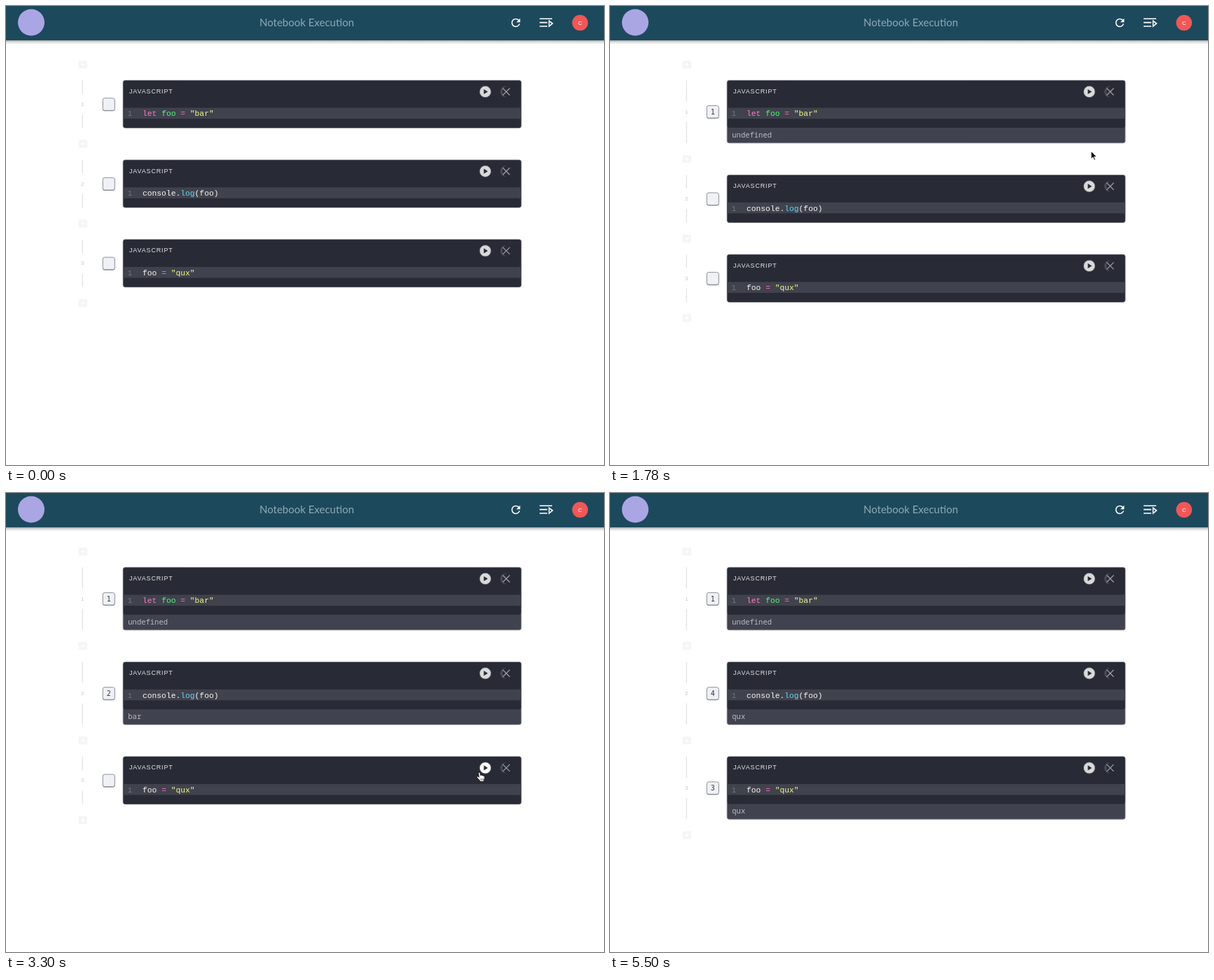
An HTML page for the animation above (6.47 s loop, 854 by 656 pixels).

```html
<!DOCTYPE html>
<html lang="en">
<head>
<meta charset="utf-8">
<title>Notebook Execution</title>
<style>
  html, body { margin: 0; width: 100%; height: 100%; overflow: hidden; background: #fff; }
  svg { display: block; width: 854px; height: 656px; }
  text { white-space: pre; }
  .title { font: 15px Lato, sans-serif; fill: #8fa9b3; text-anchor: middle; }
  .label { font: 9px "Liberation Sans", Arial, sans-serif; letter-spacing: .85px; fill: #e4e4e6; }
  .code { font: 11.3px "Liberation Mono", "Courier New", monospace; fill: #f8f8f2; }
  .out { font: 10.5px "Noto Sans Mono", "DejaVu Sans Mono", monospace; fill: #b9bac2; }
  .count { font: 10px "DejaVu Sans Mono", monospace; fill: #33353f; text-anchor: middle; }
  .index { font: 8px "Liberation Sans", Arial, sans-serif; fill: #c6c6c6; text-anchor: middle; }
  .initial { font: 8px "Liberation Sans", Arial, sans-serif; fill: #fff; text-anchor: middle; }
  .num { fill: #6c7680; }
  .kw { fill: #ff79c6; }
  .def { fill: #50fa7b; }
  .str { fill: #f1fa8c; }
  .prop { fill: #66d9ef; }
</style>
</head>
<body>
<svg id="stage" viewBox="0 0 854 656" xmlns="http://www.w3.org/2000/svg">
  <defs>
    <linearGradient id="shade" x1="0" y1="0" x2="0" y2="1">
      <stop offset="0" stop-color="#000" stop-opacity=".36"/>
      <stop offset=".45" stop-color="#000" stop-opacity=".12"/>
      <stop offset="1" stop-color="#000" stop-opacity="0"/>
    </linearGradient>
  </defs>
  <rect width="854" height="656" fill="#fff"/>
  <rect y="49" width="854" height="6" fill="url(#shade)"/>
  <rect width="854" height="49" fill="#1d495d"/>
  <circle cx="36" cy="23.5" r="19" fill="#aaa6e4"/>
  <text class="title" x="429.5" y="29">Notebook Execution</text>
  <path transform="translate(718.7 14.6) scale(.78)" fill="#fff" d="M17.65 6.35C16.2 4.9 14.21 4 12 4c-4.42 0-8 3.58-8 8s3.58 8 8 8c3.73 0 6.84-2.55 7.73-6h-2.08c-.82 2.33-3.04 4-5.65 4-3.31 0-6-2.69-6-6s2.69-6 6-6c1.66 0 3.14.69 4.22 1.78L13 11h7V4z"/>
  <path fill="none" stroke="#fff" stroke-width="1.6" d="M762 18.2H780M762 23.6H773M762 29H773M775.6 21.2V29L780.4 25.1Z"/>
  <circle cx="819.8" cy="24" r="11.3" fill="#f15757"/>
  <text class="initial" x="819.8" y="27">C</text>
  <g id="page"></g>
  <g id="cursor"></g>
</svg>
<script>
const LOOP = 6470, STEP = 20;
const TOP = 106.3, BODY = 68, OUTPUT = 21.5, GAP = 45.7;
const PLAY = { x: 684.5, y: 16.2 };

const span = (cls, s) => `<tspan class="${cls}">${s}</tspan>`;

// Each run is [time, counter, output].
const cells = [
  { code: span('kw', 'let') + ' ' + span('def', 'foo') + ' ' + span('kw', '=') + ' ' + span('str', '"bar"'),
    runs: [[1060, '1', 'undefined']] },
  { code: 'console.' + span('prop', 'log') + '(foo)',
    runs: [[2500, '2', 'bar'], [4720, '4', 'qux']] },
  { code: 'foo ' + span('kw', '=') + ' ' + span('str', '"qux"'),
    runs: [[3540, '3', 'qux']] }
];

// Pointer path: time, x, y.
const path = [
  [160, 652, 510], [460, 668, 245], [800, 681, 127], [920, 683, 125], [1060, 683, 125],
  [1240, 683, 142.5], [1720, 687, 200], [2280, 684.5, 255], [2500, 684.5, 255],
  [2840, 686, 330], [3160, 671, 403], [3300, 676, 400], [3400, 682, 394], [3540, 682, 394],
  [3880, 647, 454.5], [4200, 689, 257], [4280, 683.5, 254], [4720, 683.5, 254],
  [4940, 691, 289.5], [5360, 704, 405], [5440, 700, 550], [5500, 698, 672]
];

const shapes = {
  arrow: `<path d="M0 0V12.2L2.8 9.6L4.6 13.8L6.6 13L4.8 8.9H8.7Z" fill="#111" stroke="#fff" stroke-width="1.1" stroke-linejoin="round"/>`,
  hand: `<path d="M-1.3 .5C-1.3-1.2 1-1.2 1.2 .4L1.6 3.5C2.2 2.6 3.6 2.9 3.8 4C4.5 3.2 5.7 3.6 5.9 4.6C6.9 4.1 7.8 4.8 7.7 6C7.6 8.4 7 9.2 6.6 10.2V12.2H.6V11.1C-.9 9.6-2 8-3.4 6.6C-4.2 5.4-2.9 4.4-1.8 5.2L-.6 6.3Z" fill="#fff" stroke="#111" stroke-width=".9" stroke-linejoin="round"/>
    <path d="M2 8V10.4M3.8 8V10.4M5.5 8V10.4" stroke="#111" stroke-width=".6"/>`,
  beam: ['#111" stroke-width="2.8', '#fff" stroke-width="1.2'].map(s =>
    `<path d="M-3-6.5Q0-6.5 0-4.5Q0-6.5 3-6.5M0-4.5V4.5M-3 6.5Q0 6.5 0 4.5Q0 6.5 3 6.5M-1.6 1.8H1.6" fill="none" stroke="${s}"/>`).join('')
};

const page = document.getElementById('page');
const cursor = document.getElementById('cursor');

const addButton = `<g class="add"><rect x="103.5" y="-5.5" width="12.5" height="11" rx="1.5" fill="#f5f5f5"/>
  <path d="M107 0H112.6M109.8-2.8V2.8" stroke="#fff" stroke-width="1.3"/></g>`;

const cellMarkup = (cell, i) => `<g class="cell">
  <text class="index" x="109.3"></text>
  <path class="rail" stroke="#d9d9d9" fill="none"/>
  <g class="box">
    <rect x="138" y="-8" width="17.5" height="18" rx="3" fill="#8f929c"/>
    <rect x="138.2" y="-8.6" width="17.1" height="17.6" rx="2.8" fill="#f0f1f5" stroke="#858893" stroke-width=".9"/>
    <text class="count" x="146.7" y="3.7"></text>
  </g>
  <rect class="frame" x="167.2" y="0" width="568.6" rx="3" fill="#40424f" stroke="#777983" stroke-width=".8"/>
  <rect x="167.6" y=".4" width="567.8" height="67.3" rx="3" fill="#282a35"/>
  <text class="label" x="176" y="18.7">JAVASCRIPT</text>
  <rect x="167.6" y="39.2" width="567.8" height="15.6" fill="#40424d"/>
  <text class="code num" x="173.5" y="51">1</text>
  <text class="code" x="195" y="51">${cell.code}</text>
  <g transform="translate(${PLAY.x} ${PLAY.y})">
    <circle class="play" r="8.2" stroke="#55565e" stroke-width=".8"/>
    <path d="M-2.1-3.6L3.6 0L-2.1 3.6Z" fill="#282a35"/>
  </g>
  <circle cx="714" cy="16.2" r="8" fill="#4b4c56"/>
  <circle cx="717.5" cy="16.2" r="8.6" fill="#282a35"/>
  <path d="M709.4 11.2L719.4 21.2M719.4 11.2L709.4 21.2" stroke="#9b9ba1" stroke-width="1.3"/>
  <text class="out" x="174.3" y="81.7"></text>
</g>`;

page.innerHTML = addButton.repeat(cells.length + 1) + cells.map(cellMarkup).join('');
const adds = [...page.querySelectorAll('.add')];
cells.forEach((cell, i) => {
  const root = page.querySelectorAll('.cell')[i];
  cell.root = root;
  for (const name of ['index', 'rail', 'box', 'count', 'frame', 'play', 'out'])
    cell[name] = root.querySelector('.' + name);
  cell.index.textContent = i + 1;
});

const move = (el, x, y) => el.setAttribute('transform', `translate(${x} ${y})`);

const slope = (i, k) => (path[i + 1][k] - path[i][k]) / (path[i + 1][0] - path[i][0]);

// Monotone tangent: no overshoot at turning points or rests.
function tangent(i, k) {
  if (i === 0) return slope(0, k);
  if (i === path.length - 1) return slope(i - 1, k);
  const a = slope(i - 1, k), b = slope(i, k);
  return a * b > 0 ? 2 * a * b / (a + b) : 0;
}

function pointer(t) {
  if (t < path[0][0] || t >= path[path.length - 1][0]) return null;
  const i = path.findIndex((p, n) => t >= p[0] && t < path[n + 1][0]);
  const span = path[i + 1][0] - path[i][0], u = (t - path[i][0]) / span;
  const at = k => {
    const s = u * u * (3 - 2 * u);
    return path[i][k] * (1 - s) + path[i + 1][k] * s
      + span * u * (1 - u) * ((1 - u) * tangent(i, k) - u * tangent(i + 1, k));
  };
  return { x: at(1), y: at(2) };
}

function draw(t) {
  const p = pointer(t);
  let top = TOP, shape = 'arrow';
  move(adds[0], 0, TOP - 22.6);
  cells.forEach((cell, i) => {
    const run = cell.runs.filter(r => t >= r[0]).pop();
    const height = BODY + (run ? OUTPUT : 0), mid = height / 2;
    move(cell.root, 0, top);
    move(cell.box, 0, mid);
    cell.index.setAttribute('y', mid + 2.8);
    cell.rail.setAttribute('d', `M109.2 0V${mid - 14.5}M109.2 ${mid + 14.5}V${height}`);
    cell.frame.setAttribute('height', height);
    cell.count.textContent = run ? run[1] : '';
    cell.out.textContent = run ? run[2] : '';

    const hover = p && Math.hypot(p.x - PLAY.x, p.y - top - PLAY.y) < 12.5;
    cell.play.setAttribute('fill', hover ? '#fff' : '#d8d9da');
    if (hover) shape = 'hand';
    else if (p && p.x > 185 && p.x < 736 && p.y > top + 39 && p.y < top + 55) shape = 'beam';

    move(adds[i + 1], 0, top + height + 22.8);
    top += height + GAP;
  });
  cursor.innerHTML = p ? shapes[shape] : '';
  if (p) move(cursor, p.x, p.y);
}

function tick() {
  const t = performance.now() % LOOP;
  draw(Math.floor(t / STEP) * STEP);
  requestAnimationFrame(tick);
}
tick();
</script>
</body>
</html>
```
